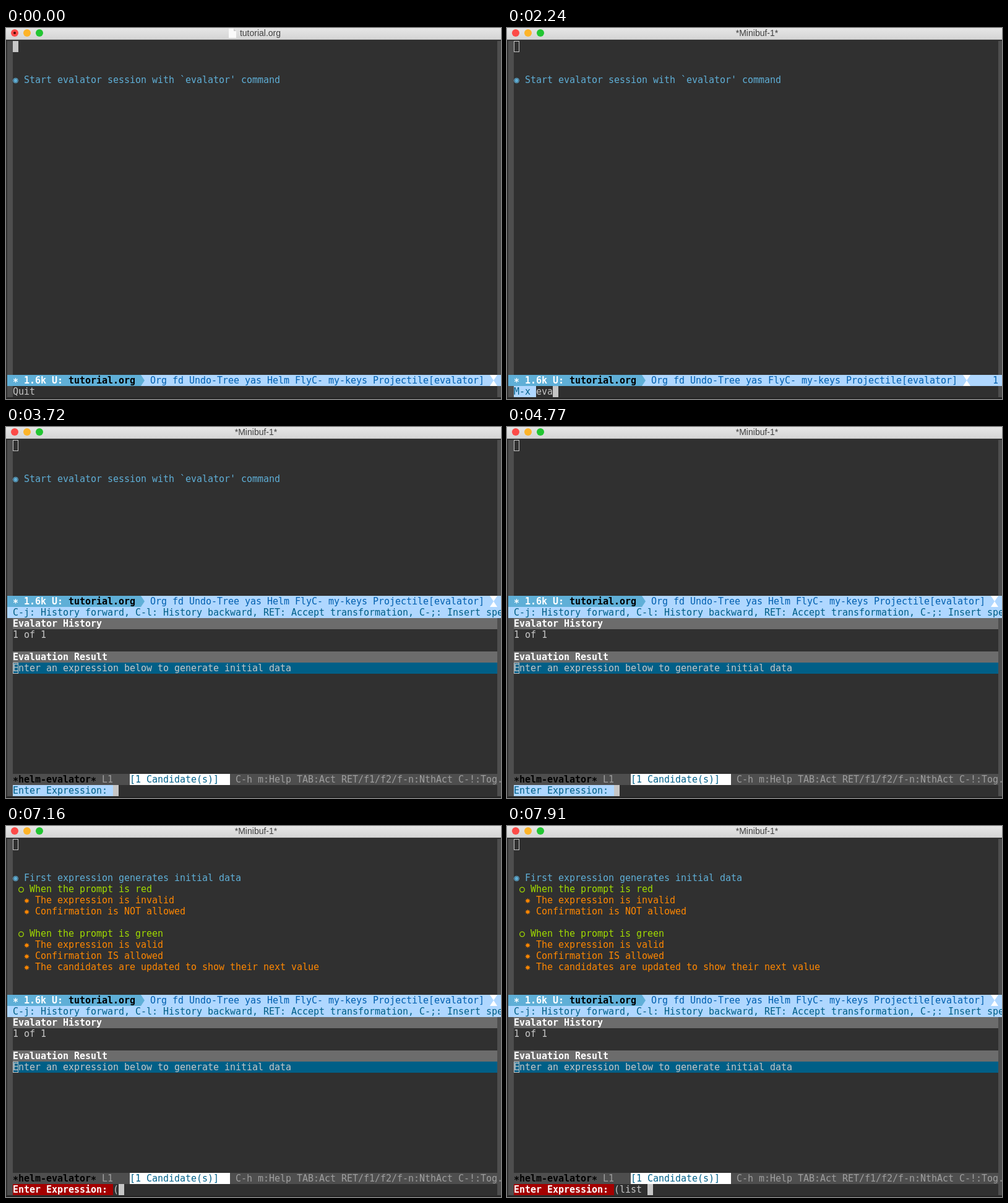
An HTML page with a canvas for the animation above (8 s loop, 800 by 600 pixels).

```html
<!DOCTYPE html>
<html lang="en">
<head>
<meta charset="utf-8">
<title>Evalator tutorial</title>
<style>
  html, body { margin: 0; width: 100%; height: 100%; overflow: hidden; background: #303030; }
  canvas { display: block; width: 800px; height: 600px; }
</style>
</head>
<body>
<canvas id="stage" width="800" height="600"></canvas>
<script>
const ctx = document.getElementById('stage').getContext('2d');
const LOOP = 8000;
const CELL = 9, LINE = 18, LEFT = 11, TOP = 21, RIGHT = 794;
const MONO = '15px "DejaVu Sans Mono", monospace';
const C = {
  bg: '#303030', fringe: '#4e4e4e', text: '#c6c6c6', white: '#ffffff', black: '#000000',
  sky: '#5fafd7', pale: '#afd7ff', link: '#005faf', deep: '#005f87',
  green: '#a1db00', orange: '#ff8700', head: '#6c6c6c', dim: '#9e9e9e', error: '#a40000'
};

// Typing: [time, number of characters shown]
const COMMAND = 'evalator';
const COMMAND_KEYS = [[1790, 1], [2090, 2], [2240, 3], [2530, 4], [2680, 5], [2820, 6], [3120, 7], [3270, 8]];
const EXPRESSION = '(list ';
const EXPRESSION_KEYS = [[7160, 1], [7460, 2], [7610, 4], [7760, 5], [7910, 6]];

const rowY = row => TOP + row * LINE;
const colX = col => LEFT + col * CELL;

function typed(text, keys, t) {
  let count = 0;
  for (const [time, n] of keys) if (t >= time) count = n;
  return text.slice(0, count);
}

function rect(x, y, w, h, color) {
  ctx.fillStyle = color;
  ctx.fillRect(x, y, w, h);
}

function disc(x, y, r, color) {
  ctx.fillStyle = color;
  ctx.beginPath();
  ctx.arc(x, y, r, 0, Math.PI * 2);
  ctx.fill();
}

function ring(x, y, r, width, color) {
  ctx.strokeStyle = color;
  ctx.lineWidth = width;
  ctx.beginPath();
  ctx.arc(x, y, r, 0, Math.PI * 2);
  ctx.stroke();
}

function poly(points, color) {
  ctx.fillStyle = color;
  ctx.beginPath();
  points.forEach(([x, y]) => ctx.lineTo(x, y));
  ctx.fill();
}

// Text on the terminal grid; asterisks sit at mid height.
function textAt(str, x, row, color, bold) {
  ctx.font = (bold ? 'bold ' : '') + MONO;
  ctx.textAlign = 'left';
  ctx.fillStyle = color;
  const base = rowY(row) + 14;
  [...str].forEach((ch, i) => {
    if (ch !== ' ') ctx.fillText(ch, x + i * CELL, base + (ch === '*' ? 3 : 0));
  });
}

const put = (str, col, row, color, bold) => textAt(str, colX(col), row, color, bold);

function cursor(col, row, hollow) {
  const x = colX(col), y = rowY(row);
  if (!hollow) return rect(x, y, CELL, LINE, C.text);
  ctx.strokeStyle = C.text;
  ctx.lineWidth = 1;
  ctx.strokeRect(x + 0.5, y + 0.5, CELL - 1, LINE - 1);
}

function titleBar(idle) {
  const shade = ctx.createLinearGradient(0, 0, 0, 19);
  shade.addColorStop(0, '#e6e6e6');
  shade.addColorStop(1, '#d4d4d4');
  rect(0, 0, 800, 19, shade);
  rect(0, 18, 800, 1, '#bcbcbc');
  ['#fc4b48', '#fdb429', '#22c532'].forEach((color, i) => disc(14 + i * 20, 8, 6, color));
  if (idle) {
    disc(14, 8, 2, '#4a0a08');
    poly([[360, 1], [368, 1], [372, 5], [372, 16], [360, 16]], '#fafafa');
    poly([[368, 1], [372, 5], [368, 5]], '#cccccc');
  }
  ctx.font = '14px "Liberation Sans", Arial, sans-serif';
  ctx.textAlign = 'center';
  ctx.fillStyle = '#404040';
  ctx.fillText(idle ? 'tutorial.org' : '*Minibuf-1*', idle ? 411 : 404, 13);
}

function hourglass(x, y) {
  poly([[x, y], [x + 12, y], [x + 6, y + 9]], C.white);
  poly([[x, y + LINE], [x + 12, y + LINE], [x + 6, y + 9]], C.white);
}

function modeLine(row, prompting) {
  const y = rowY(row);
  const modes = 'Org fd Undo-Tree yas ' + (prompting ? '' : 'Helm ') + 'FlyC- my-keys Projectile[evalator]';
  rect(2, y, 798, LINE, C.pale);
  rect(2, y, 216, LINE, C.sky);
  poly([[218, y], [224, y + 9], [218, y + LINE]], C.sky);
  put('* 1.6k U:', 0, row, C.white, true);
  put('tutorial.org', 10, row, C.black, true);
  textAt(modes, 233, row, C.link);
  hourglass(233 + (modes.length + 1) * CELL, y);
  if (prompting) put('1', 86, row, C.link);
}

function prompt(label, input, back, color, bold) {
  rect(LEFT, rowY(31), label.length * CELL, LINE, back);
  put(label, 0, 31, color, bold);
  put(input, label.length, 31, C.text);
  cursor(label.length + input.length, 31);
}

function star(x, y, color) {
  const points = [];
  for (let i = 0; i < 16; i++) {
    const r = i % 2 ? 2.3 : 4.5, a = i * Math.PI / 8;
    points.push([x + r * Math.sin(a), y - r * Math.cos(a)]);
  }
  poly(points, color);
}

function heading(level, row, str) {
  const x = colX(level) + 4.5, y = rowY(row) + 10;
  const color = [C.sky, C.green, C.orange][level];
  if (level === 0) {
    ring(x, y, 4, 1, color);
    disc(x, y, 2.9, color);
  } else if (level === 1) {
    ring(x, y, 3.8, 1.3, color);
  } else {
    star(x, y, color);
  }
  put(str, level + 2, row, color);
}

function outline() {
  heading(0, 3, 'First expression generates initial data');
  heading(1, 4, 'When the prompt is red');
  heading(2, 5, 'The expression is invalid');
  heading(2, 6, 'Confirmation is NOT allowed');
  heading(1, 8, 'When the prompt is green');
  heading(2, 9, 'The expression is valid');
  heading(2, 10, 'Confirmation IS allowed');
  heading(2, 11, 'The candidates are updated to show their next value');
}

function section(row, str) {
  rect(LEFT, rowY(row), RIGHT - LEFT, LINE, C.head);
  put(str, 0, row, C.white, true);
}

function helmPane() {
  rect(2, rowY(15), 798, LINE, C.pale);
  put('C-j: History forward, C-l: History backward, RET: Accept transformation, C-;: Insert spe', 0, 15, C.deep);
  section(16, 'Evalator History');
  put('1 of 1', 0, 17, C.text);
  section(19, 'Evaluation Result');
  rect(LEFT, rowY(20), RIGHT - LEFT, LINE, C.deep);
  put('Enter an expression below to generate initial data', 0, 20, C.text);
  cursor(0, 20, true);

  rect(2, rowY(30), 798, LINE, C.fringe);
  put('*helm-evalator*', 0, 30, C.black, true);
  put('L1', 16, 30, C.dim);
  rect(colX(21), rowY(30), 18 * CELL, LINE, C.white);
  put('[1 Candidate(s)]', 21, 30, C.deep);
  put('C-h m:Help TAB:Act RET/f1/f2/f-n:NthAct C-!:Tog.', 40, 30, C.dim);
}

function draw(t) {
  const idle = t < 1340, helm = t >= 3720;
  rect(0, 0, 800, 600, C.bg);
  rect(2, TOP, 9, 576, C.fringe);
  rect(RIGHT, TOP, 6, 576, C.fringe);
  rect(0, 598, 800, 2, '#222222');
  titleBar(idle);
  cursor(0, 0, !idle);

  if (t < 4770) heading(0, 3, "Start evalator session with `evalator' command");
  else if (t >= 5060) outline();

  modeLine(helm ? 14 : 30, !idle && !helm);

  if (idle) {
    put('Quit', 0, 31, C.text);
  } else if (!helm) {
    if (t < 1490) rect(355, 75, 19, 504, C.bg); // redraw gap
    prompt('M-x ', typed(COMMAND, COMMAND_KEYS, t), C.pale, C.deep);
  } else {
    helmPane();
    const input = typed(EXPRESSION, EXPRESSION_KEYS, t);
    if (input) prompt('Enter Expression: ', input, C.error, C.white, true);
    else prompt('Enter Expression: ', '', C.pale, C.deep);
  }
}

const start = performance.now();
function tick() {
  draw((performance.now() - start) % LOOP);
  requestAnimationFrame(tick);
}
tick();
</script>
</body>
</html>
```
